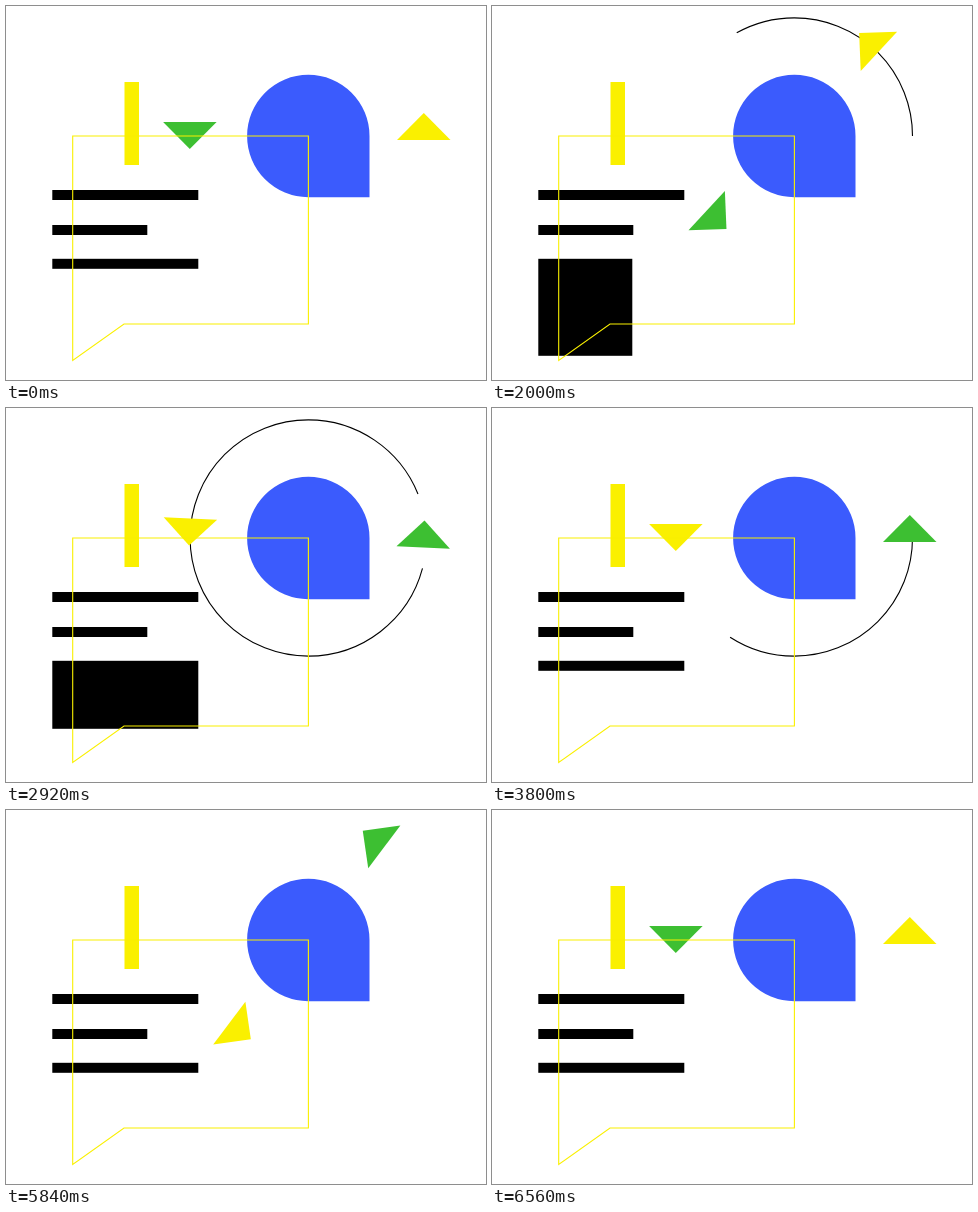
Write an HTML page that moves like this. It is 480 px wide and 374 px high and loops after 6.72 s.

```html
<!DOCTYPE html>
<html lang="en">
<head>
<meta charset="utf-8">
<title>Shapes</title>
<style>
  html, body { margin: 0; width: 100%; height: 100%; overflow: hidden; background: #fff; }
  svg { display: block; width: 100%; height: 100%; }
</style>
</head>
<body>
<svg viewBox="0 0 480 374">
  <path fill="#3b5bfd" d="M302.3 191.2A61.2 61.2 0 1 1 363.5 130V191.2Z"/>
  <path id="orbit" fill="none" stroke="#000" stroke-width="1.1" pathLength="360"
        d="M420.5 130A118.2 118.2 0 0 0 184.1 130A118.2 118.2 0 0 0 420.5 130"/>
  <rect id="bar" x="118.5" width="14.5" fill="#faf000"/>
  <rect x="46.3" y="184" width="146" height="10"/>
  <rect x="46.3" y="219" width="95" height="10"/>
  <rect id="block" x="46.3" y="252.8"/>
  <g id="pair">
    <path fill="#faf000" d="M90.2 9H143.7L117 -18Z"/>
    <path fill="#3dbf32" d="M-90.2 -9H-143.7L-117 18Z"/>
  </g>
  <path fill="none" stroke="#faf000" stroke-width="1.1" d="M66.7 130H302.4V318H118L66.7 354.5Z"/>
</svg>
<script>
  const LOOP = 6720, STEP = 40;
  const [orbit, bar, block, pair] =
    ["orbit", "bar", "block", "pair"].map(id => document.getElementById(id));

  const clamp = u => Math.min(1, Math.max(0, u));
  const smooth = u => u * u * (3 - 2 * u);

  // Symmetric ease, cubic-bezier(pull, 0, 1 - pull, 1), solved by bisection.
  function ease(t, start, end, pull) {
    const u = clamp((t - start) / (end - start));
    if (u === 0 || u === 1) return u;
    let low = 0, high = 1;
    for (let i = 0; i < 24; i++) {
      const s = (low + high) / 2, r = 1 - s;
      const x = 3 * r * r * s * pull + 3 * r * s * s * (1 - pull) + s ** 3;
      if (x < u) low = s; else high = s;
    }
    return smooth(low);
  }

  // Value at t from [time, value] keys, eased between neighbours.
  function track(t, keys) {
    let [time, value] = keys[0];
    for (const [nextTime, nextValue] of keys) {
      if (t < nextTime) {
        return value + (nextValue - value) * smooth(clamp((t - time) / (nextTime - time)));
      }
      [time, value] = [nextTime, nextValue];
    }
    return value;
  }

  const blockWidth = [[660, 146], [920, 19], [1180, 95], [2020, 94], [2640, 146]];
  const blockHeight = [[1280, 10], [1840, 103], [2000, 97], [2680, 97], [2800, 114], [3060, 10]];
  const barTop = [[4180, 76], [4460, 2], [4720, 40], [4920, 13], [5480, 13], [5720, 76]];

  function draw(t) {
    const turn = 180 * (ease(t, 940, 3300, 0.85) + ease(t, 5490, 6560, 0.167));
    pair.setAttribute("transform", `translate(300.8 125) rotate(${-turn})`);

    const head = 360 * ease(t, 1000, 3350, 0.58);
    const tail = 360 * ease(t, 2382, 4872, 0.58);
    orbit.setAttribute("stroke-dasharray", `${head - tail} 720`);
    orbit.setAttribute("stroke-dashoffset", -tail);
    orbit.setAttribute("visibility", head - tail > 0.01 ? "visible" : "hidden");

    block.setAttribute("width", track(t, blockWidth));
    block.setAttribute("height", track(t, blockHeight));

    const top = track(t, barTop);
    bar.setAttribute("y", top);
    bar.setAttribute("height", 159 - top);
  }

  const began = performance.now();
  function tick() {
    const t = (performance.now() - began) % LOOP;
    draw(Math.floor(t / STEP) * STEP);
    requestAnimationFrame(tick);
  }
  tick();
</script>
</body>
</html>
```
